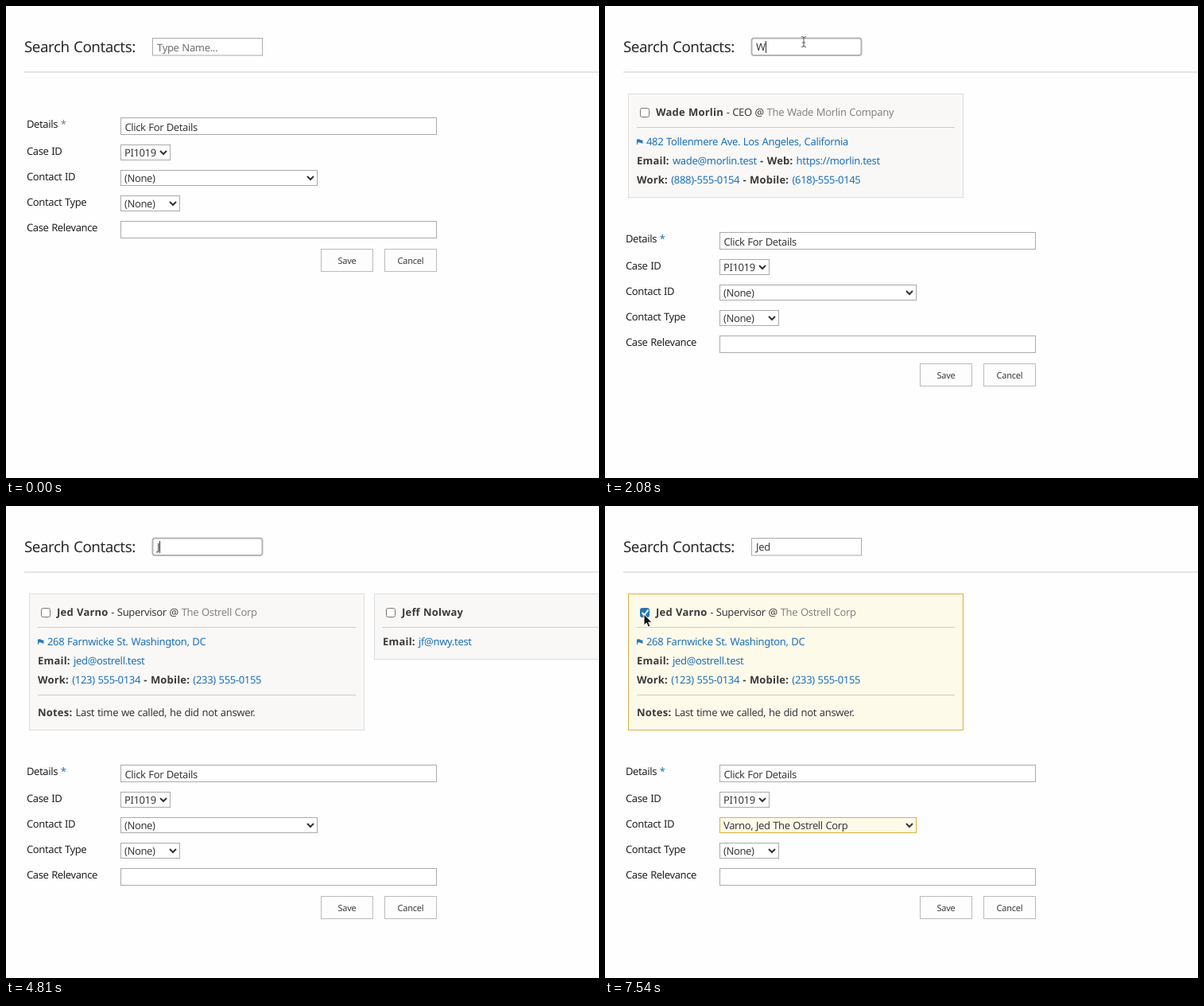
These frames come from a looping animation (746x593 px, 8000 ms). An HTML page:

```html
<!DOCTYPE html>
<html lang="en">
<head>
<meta charset="utf-8">
<title>Contact search</title>
<style>
  html, body { margin: 0; width: 100%; height: 100%; overflow: hidden; background: #fefefe; }
  svg { display: block; width: 746px; height: 593px; }
  text { font: 13px "Noto Sans", "Open Sans", sans-serif; letter-spacing: -.025em; word-spacing: .05em; fill: #3a3a3a; text-rendering: geometricPrecision; }
  #form text { letter-spacing: -.03em; }
  .title { font-size: 18.8px; fill: #2a2a2a; }
  .label { fill: #222; }
  #form .small { font-size: 11px; letter-spacing: -.02em; text-anchor: middle; }
  .bold { font-weight: 700; letter-spacing: .015em; }
  .link { fill: #1c70b8; }
  .mute { fill: #858585; }
  .hint { fill: #707070; }
  .box { fill: #fff; stroke: #aaa; }
  .rule { stroke: #ccc; }
  .card > rect:first-child { fill: #f9f8f7; stroke: #ddd; }
  .check { fill: #fff; stroke: #777; }
  .tick { display: none; fill: none; stroke: #fff; stroke-width: 2; }
  .chevron { fill: none; stroke: #333; stroke-width: 2; }
  .picked .card > rect:first-child { fill: #fefaea; stroke: #dcb040; }
  .picked .check { fill: #2775b6; stroke: #2775b6; }
  .picked .tick { display: inline; }
  .picked #contactBox { fill: #fefaea; stroke: #dcb040; }
</style>
</head>
<body>
<svg id="stage" viewBox="0 0 746 593"></svg>
<script>
const LOOP = 8000, STEP = 130;
const $ = id => document.getElementById(id);

const text = (x, y, content, cls = '', id = '') =>
  `<text x="${x}" y="${y}" class="${cls}" id="${id}">${content}</text>`;
const span = (cls, content) => `<tspan class="${cls}">${content}</tspan>`;
const bold = content => span('bold', content);
const link = content => span('link', content);
const rect = (x, y, w, h, attrs = 'class="box"') =>
  `<rect x="${x + .5}" y="${y + .5}" width="${w}" height="${h}" ${attrs}/>`;
const rule = (x1, x2, y) => `<path class="rule" d="M${x1} ${y + .5}H${x2}"/>`;

const select = (y, w, value, id) =>
  rect(144, y, w, 19, `class="box" id="${id}Box"`) +
  text(149, y + 14.5, value, '', id) +
  `<path class="chevron" d="M${w + 132} ${y + 8}l4 4 4-4"/>`;

const button = (x, label) => rect(x, 305, 65, 28, 'fill="#fdfdfd" stroke="#bbb"') + text(x + 33, 324, label, 'small');

const flag = '<path d="M40.5 167.5V174" stroke="#2478bd"/><path d="M41 167.5q2 -.8 3.5 .5t3.5 .2l-1 2 1 2q-2 .5-3.5-.4t-3.5 0z" fill="#2478bd"/>';

// Lines are [y, markup, indent]; rules are extra divider positions.
const card = (id, x, h, heading, lines, rules = []) => `
  <g id="${id}" class="card" transform="translate(${x})">
    ${rect(0, 110, 421, h)}
    ${rect(15, 128, 11, 11, 'rx="2" class="check"')}
    <path class="tick" d="M17.5 134l3 3 5-6.5"/>
    ${text(35, 137.5, heading)}
    ${[152, ...rules].map(y => rule(11, 411, y)).join('')}
    ${lines.map(([y, markup, indent = 0]) => text(11 + indent, y, markup)).join('')}
  </g>`;

const labels = ['Details <tspan id="star">*</tspan>', 'Case ID', 'Contact ID', 'Contact Type', 'Case Relevance'];
const labelY = [153, 187, 219, 251, 283];

$('stage').innerHTML = `
  ${text(23, 58, 'Search Contacts:', 'title')}
  ${rect(184, 40, 138, 21.5, 'id="search" fill="#fff"')}
  ${text(190, 56, '', '', 'typed')}
  ${text(190, 56.5, 'Type Name...', 'hint', 'hint')}
  <path id="caret" d="M.5 44V59" stroke="#333"/>
  ${rule(23, 746, 82.5)}
  <g id="wade">
    ${card('wadeCard', 29, 130,
      bold('Wade Morlin') + ' - CEO @ ' + span('mute', 'The Wade Morlin Company'), [
        [175, link('482 Tollenmere Ave. Los Angeles, California'), 12],
        [199, bold('Email: ') + link('wade@morlin.test') + bold(' - Web: ') + link('https://morlin.test')],
        [223, bold('Work: ') + link('(888)-555-0154') + bold(' - Mobile: ') + link('(618)-555-0145')]
      ])}
    ${flag}
  </g>
  <g id="jed">
    ${card('jedCard', 29, 171,
      bold('Jed Varno') + ' - Supervisor @ ' + span('mute', 'The Ostrell Corp'), [
        [175, link('268 Farnwicke St. Washington, DC'), 12],
        [199, bold('Email: ') + link('jed@ostrell.test')],
        [223, bold('Work: ') + link('(123) 555-0134') + bold(' - Mobile: ') + link('(233) 555-0155')],
        [264, bold('Notes: ') + 'Last time we called, he did not answer.']
      ], [237])}
    ${flag}
  </g>
  ${card('jeff', 463, 82, bold('Jeff Nolway'), [[175, bold('Email: ') + link('jf@nwy.test')]])}
  <g id="form">
    ${labels.map((label, i) => text(26, labelY[i], label, 'label')).join('')}
    ${rect(144, 140, 397, 21)}
    ${text(149.5, 156.5, 'Click For Details')}
    ${select(174, 62, 'PI1019', 'case')}
    ${select(206, 247, '(None)', 'contact')}
    ${select(238, 74, '(None)', 'type')}
    ${rect(144, 270, 397, 21)}
    ${button(396, 'Save')}
    ${button(476, 'Cancel')}
  </g>
  <g id="pointer">
    <path id="arrow" d="M0 0V14l3.2-3 2.2 5 2.5-1-2.2-4.8H10z" fill="#111" stroke="#fff"/>
    <path id="beam" d="M-3 -6.5q3 0 3 2V4.5q0 2-3 2M3 -6.5q-3 0-3 2M3 6.5q-3 0-3-2M-2 1H2" fill="none" stroke="#555"/>
  </g>`;

// Step timelines: [start, value]
const query = [[0, ''], [1950, 'W'], [2470, 'Wa'], [2730, 'Wad'], [3250, 'Wa'], [3380, 'W'], [3510, ''],
  [4680, 'J'], [5070, 'Je'], [5460, 'Jed']];
const results = [[0, ''], [2080, 'wade'], [3640, ''], [4810, 'jed jeff'], [5460, 'jed']];
const caretOn = [[0, false], [910, true], [1430, false], [1950, true], [2990, false], [3250, true],
  [4160, false], [4680, true], [5980, false], [6500, true], [7020, false]];
const pointerOn = [[0, false], [130, true], [3250, false], [6500, true]];
const path = [[130, 48, 171], [780, 235, 49], [1040, 235, 49], [1430, 250, 45], [3250, 250, 45],
  [6500, 234, 47], [6630, 234, 47], [7280, 49, 136]];

const at = (steps, t) => steps.filter(([start]) => start <= t).pop()[1];
const show = (id, on) => $(id).style.display = on ? '' : 'none';

function position(t) {
  const i = path.findIndex(([time]) => time > t);
  if (i <= 0) return path[i < 0 ? path.length - 1 : 0].slice(1);
  const [t0, x0, y0] = path[i - 1], [t1, x1, y1] = path[i];
  const p = (t - t0) / (t1 - t0), ease = p * p * (3 - 2 * p);
  return [x0 + (x1 - x0) * ease, y0 + (y1 - y0) * ease];
}

function draw(t) {
  const typed = at(query, t), found = at(results, t);
  const focused = t >= 910 && t < 7540, picked = t >= 7540;

  $('typed').textContent = typed;
  show('hint', !typed);
  show('caret', at(caretOn, t));
  $('caret').setAttribute('transform', `translate(${Math.round(190 + $('typed').getComputedTextLength())})`);
  $('search').setAttribute('rx', focused ? 3 : 0);
  $('search').setAttribute('stroke', focused ? '#b4b4b4' : '#aaa');
  $('search').setAttribute('stroke-width', focused ? 2 : 1);

  for (const id of ['wade', 'jed', 'jeff']) show(id, found.split(' ').includes(id));
  const shift = found === 'wade' ? 144 : found ? 185 : 0;
  $('form').setAttribute('transform', `translate(0 ${shift})`);
  $('star').style.fill = found ? '#1c70b8' : '#777';
  $('stage').classList.toggle('picked', picked);
  $('contact').textContent = picked ? 'Varno, Jed The Ostrell Corp' : '(None)';

  const [x, y] = position(t), overField = x > 184 && x < 323 && y > 40 && y < 63;
  show('pointer', at(pointerOn, t));
  show('arrow', !overField);
  show('beam', overField);
  $('pointer').setAttribute('transform', `translate(${x} ${y})`);
}

const begin = performance.now();
function frame() {
  const t = (performance.now() - begin) % LOOP;
  draw(Math.floor(t / STEP) * STEP);
  requestAnimationFrame(frame);
}
frame();
</script>
</body>
</html>
```
